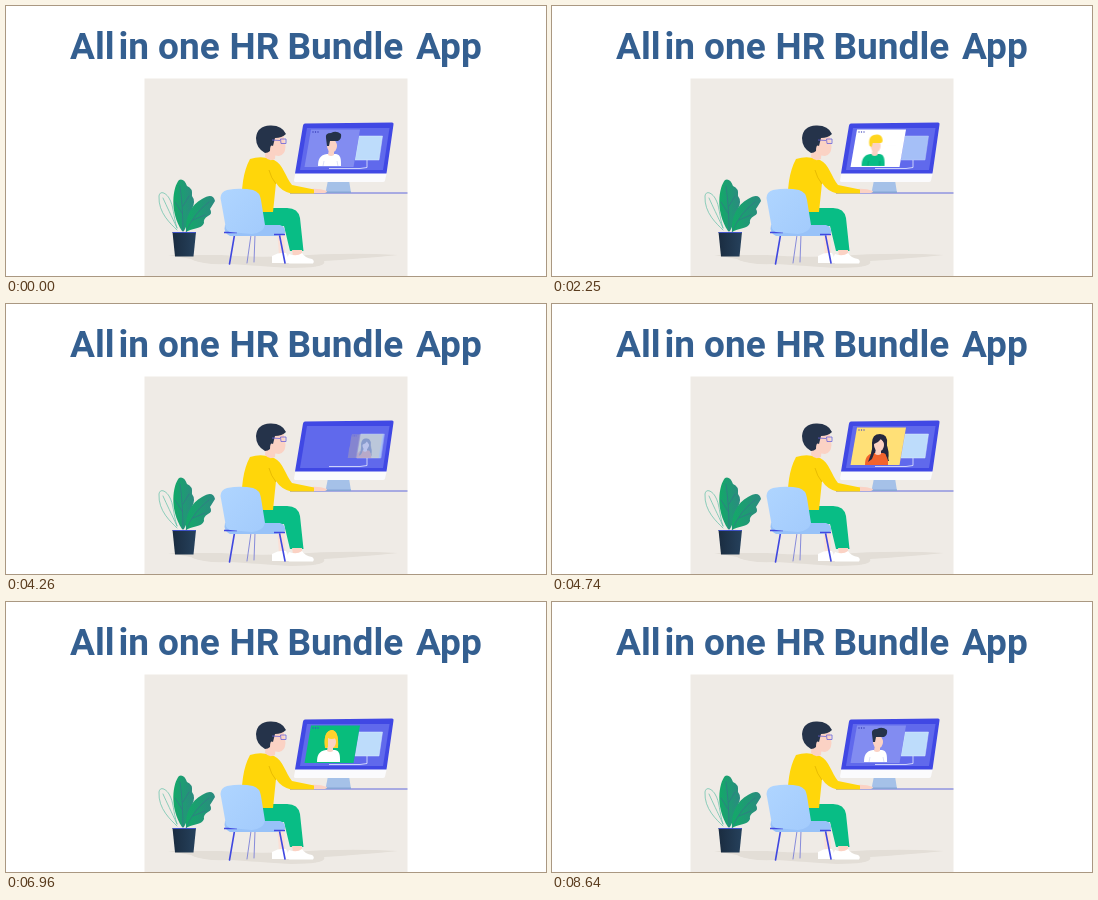
Animation, 540 px wide and 270 px high, one loop 9000 ms. Source, as an HTML page:

```html
<!DOCTYPE html>
<html lang="en">
<head>
<meta charset="utf-8">
<title>HR Bundle App</title>
<style>
html, body { margin: 0; width: 100%; height: 100%; overflow: hidden; background: #fff; }
svg { display: block; width: 540px; height: 270px; }
.title { font: 600 37px Roboto, Arial, sans-serif; fill: #345f90; }

/* A new card grows out of the side panel, then slides left into place. */
.card, .guest, .doc, .line, .panel { animation: 9s ease-out infinite both; }
.card { transform-origin: 326px 142px; }
.man { animation-name: man; }
.boy { animation-name: boy; }
.girl { animation-name: girl; }
.lady { animation-name: lady; }
.guest { animation-name: guest; }
.doc { animation-name: doc; }
.panel { animation-name: panel; }
.line { animation-name: line; transform-origin: 305px 0; }
.line.late { animation-name: late; }

@keyframes man {
  0%, 10.33% { opacity: 1; transform: none; }
  13%, 88.32% { opacity: 0; transform: none; }
  88.33% { opacity: 0; transform: translate(37px, 0) scale(.52); }
  90.8% { opacity: 1; transform: translate(20px, 0); }
  96%, 100% { opacity: 1; transform: none; }
}
@keyframes boy {
  0%, 10.33% { opacity: 0; transform: translate(37px, 0) scale(.52); }
  13.66% { opacity: 1; transform: translate(20px, 0); }
  20.33%, 43.5% { opacity: 1; transform: none; }
  47%, 100% { opacity: 0; transform: none; }
}
@keyframes girl {
  0%, 47% { opacity: 0; transform: translate(37px, 0) scale(.52); }
  49.3% { opacity: 1; transform: translate(20px, 0); }
  52.67%, 67.67% { opacity: 1; transform: none; }
  70.3%, 100% { opacity: 0; transform: none; }
}
@keyframes lady {
  0%, 67.67% { opacity: 0; transform: translate(37px, 0) scale(.52); }
  71% { opacity: 1; transform: translate(20px, 0); }
  77.33%, 88.33% { opacity: 1; transform: none; }
  90.8%, 100% { opacity: 0; transform: none; }
}
@keyframes guest {
  0%, 13.67% { transform: translate(324px, 142px); }
  20.33%, 25% { transform: translate(321.5px, 142px); }
  28.67%, 100% { transform: translate(340px, 134px) scale(.34); }
}
@keyframes doc {
  0%, 25% { opacity: 0; }
  28.67%, 100% { opacity: 1; }
}
@keyframes panel {
  0%, 10.33%, 52.67%, 67.67%, 77.33%, 88.33%, 96%, 100% { opacity: 1; transform: none; }
  13.66%, 49.3%, 71%, 90.8% { opacity: .8; transform: translate(7px, 0); }
  20.33%, 47% { opacity: .75; transform: none; }
}
@keyframes line {
  0%, 25% { transform: scaleX(0); }
  28.67%, 100% { transform: none; }
}
@keyframes late {
  0%, 37% { transform: scaleX(0); }
  43%, 100% { transform: none; }
}
</style>
</head>
<body>
<svg viewBox="0 0 540 270">
  <defs>
    <path id="win" d="M305 123.5H354L347.500 161H298.500Z"/>
    <path id="bust" d="M-12 18C-12 11 -10 7 -3 6H6C11 7 11 11 11 18Z"/>
    <g id="face" fill="#fbd2c4">
      <path d="M-1 1H4V7Q1 9 -2 7Z"/>
      <ellipse cx="2" cy="-2" rx="5" ry="6.500"/>
    </g>
    <g id="dots">
      <circle cx="307" cy="126" r=".7"/>
      <circle cx="309.500" cy="126" r=".7"/>
      <circle cx="312" cy="126" r=".7"/>
    </g>
    <clipPath id="screen"><path d="M298 120H386L379 164H291Z"/></clipPath>
    <linearGradient id="seat" x2="1" y2="1">
      <stop stop-color="#afd5ff"/><stop offset="1" stop-color="#a3cbfc"/>
    </linearGradient>
    <linearGradient id="pot" x2="1">
      <stop stop-color="#1a2c40"/><stop offset="1" stop-color="#26415c"/>
    </linearGradient>
    <linearGradient id="leaf" x2="1">
      <stop stop-color="#12aa68"/><stop offset="1" stop-color="#2b8a80"/>
    </linearGradient>
  </defs>

  <text class="title" y="53"><tspan x="64">All</tspan><tspan x="112.500">in</tspan><tspan x="152">one</tspan><tspan x="223.500">HR</tspan><tspan x="281.500">Bundle</tspan><tspan x="410">App</tspan></text>

  <path fill="#efebe6" d="M138.500 72.500H401.500V270H138.500Z"/>
  <path fill="#e3ded7" d="M162 249H215Q250 252 285 250Q340 246 392 249Q350 253 318 255Q322 262 285 262Q240 259 222 258Q195 259 185 253Z"/>

  <!-- plant -->
  <g stroke-linejoin="round" stroke-linecap="round">
    <path fill="none" stroke="#5fbfa6" stroke-width=".7" d="M171 224C165 218 152 207 153 190C154 184 160 187 163 192C168 200 167 210 171 222M171 222C165 209 161 201 157 192"/>
    <path fill="url(#leaf)" d="M176 225C163 205 167 181 173 174Q178 172 181 180Q187 182 186 190Q190 195 186 203C185 212 181 219 178 225Z"/>
    <path fill="url(#leaf)" d="M180 226C179 211 185 199 196 193Q207 186 209 195Q206 200 204 203Q207 208 202 210Q197 213 198 217C196 223 186 222 180 226Z"/>
    <path fill="none" stroke="#3a6f8c" stroke-width=".6" d="M177 226Q177 200 174 180M180 226Q188 207 203 196M177 200L183 190M176 207L169 196M187 214L199 209"/>
    <path fill="url(#pot)" d="M166.500 226H190L187.500 250.500H169Z"/>
    <path stroke="#3f52c8" d="M167 226.500H189.500"/>
  </g>

  <!-- desk and monitor -->
  <path stroke="#6168dd" d="M284 187H401.500"/>
  <path fill="#a5c1e8" d="M322 174H343L345 187H319.500Z"/>
  <path fill="#86a5d6" d="M319.500 185.500H345V187H319.500Z"/>
  <path fill="#fbfbfd" d="M289.500 166H381L379 174.500Q378.500 176 377 176H289.500Q288 176 288 174.500Z"/>
  <path fill="#4048e4" d="M299 117.500L386 116.500Q388 116.500 387.500 118.500L380.500 167.500H289L297 119.500Q297.500 117.500 299 117.500Z"/>
  <path fill="#6069ec" d="M301 122H383.500L377 164H294Z"/>
  <g clip-path="url(#screen)">
    <path fill="none" stroke="#e8ecff" stroke-width=".8" d="M323 162.500H354L361 161.500V154"/>
    <path class="panel" fill="#bddcfb" stroke="#d9eafd" stroke-width=".5" d="M353 130H376.500L373 154H349Z"/>

    <g class="card man">
      <use href="#win" fill="#828cf1"/>
      <use href="#dots" fill="#3238b4"/>
      <g transform="translate(324 142)">
        <use href="#bust" fill="#fff"/>
        <use href="#face"/>
        <path fill="#25334a" d="M-3 -2L-4 -10Q-5 -15 1 -15Q6 -18 11 -14Q12 -9 8 -7L0 -7L-1 -2Z"/>
        <path fill="none" stroke="#c5cdf1" stroke-width=".6" d="M-7 18L-6 13M7 13L8 18"/>
      </g>
    </g>

    <g class="card boy">
      <use href="#win" fill="#fff"/>
      <use href="#dots" fill="#4b50c0"/>
      <g class="doc">
        <path fill="#dbeaf7" d="M335.500 128H346L344.500 139.500H334.500Z"/>
        <g stroke-width="1.100">
          <path class="line" stroke="#4654dd" d="M307.500 131.500H331"/>
          <path class="line" stroke="#aab9ef" d="M307 134H327"/>
          <path class="line late" stroke="#d5dcf5" d="M305 140H331M304.500 143.500H326"/>
          <path class="line" stroke="#3d49d8" stroke-width="1.500" d="M303.500 148.500H309M311 148.500H316M318 148.500H323"/>
          <path class="line late" stroke="#c7d1f2" d="M302 153.500H341"/>
        </g>
      </g>
      <g class="guest">
        <use href="#bust" fill="#08bd85"/>
        <use href="#face"/>
        <path fill="#ffd51d" d="M-4 -2Q-6 -11 0 -13Q8 -15 9 -8Q9 -5 7 -5H-1L-2 -1Z"/>
        <path fill="none" stroke="#07966a" stroke-width=".6" d="M-6 18L-5 13M6 18V13"/>
      </g>
    </g>

    <g class="card girl">
      <use href="#win" fill="#ffe077"/>
      <use href="#dots" fill="#4b50c0"/>
      <g transform="translate(325 143)">
        <path fill="#25283f" d="M-9 15Q-4 5 -5 -4Q-5 -13 3 -13Q11 -13 10 -3Q9 6 12 14Z"/>
        <use href="#bust" fill="#f2632c"/>
        <use href="#face"/>
        <path fill="#25283f" d="M-3 -3Q-4 -12 3 -12Q10 -12 9 -4Q5 -6 4 -8Q2 -5 -3 -3ZM-4 -2Q-1 4 -5 12L-9 15Q-5 6 -4 -2ZM8 -2Q7 6 11 13Q13 5 9 -4Z"/>
      </g>
    </g>

    <g class="card lady">
      <use href="#win" fill="#08bd7c"/>
      <use href="#dots" fill="#3d43d5"/>
      <g transform="translate(323 142)">
        <path fill="#ffd22b" d="M-4 4Q-6 -13 3 -14Q10 -13 9 4Z"/>
        <use href="#bust" fill="#fff"/>
        <use href="#face"/>
        <path fill="#ffd22b" d="M-4 3Q-6 -13 3 -14Q10 -13 9 3L7 2V-6Q2 -4 -1 -6V3Z"/>
      </g>
    </g>
  </g>

  <!-- worker -->
  <path fill="#fbe0d6" d="M271 222H278L279 249H273Z"/>
  <path fill="#fff" d="M266 250Q273 246 280 247L285 257H266Z"/>
  <path fill="#08bd85" d="M250 202H279Q292 201 294 212L297.500 245H284L278 220L253 224Z"/>
  <path fill="#fbd2c4" d="M286 244H296V250H287Z"/>
  <path fill="#fff" d="M283 248Q291 251 296 247Q299 252 306 253Q309 255 307 257.500H283Q279 255 283 248Z"/>
  <path fill="#fbd2c4" d="M304 183Q313 182 321 185Q321 187 317 187H304Z"/>
  <path fill="#ffd60a" d="M244 153Q256 149 268 154C277 158 280 172 286 179L308 183.500V187.500H285Q275 185 270 177L267 206H236Q234 171 244 153Z"/>
  <path fill="none" stroke="#e2b500" stroke-width=".8" d="M270 178Q265 172 263 164"/>
  <path fill="#fbd2c4" d="M260 140H270L269 153Q263 156 259 151Z"/>
  <path fill="#fbd2c4" d="M264 128H277.500L279.500 141Q279 149 273 150Q265 150 263 141Z"/>
  <path fill="#25334a" d="M259 147Q250 142 250 132Q251 120 264 119.500Q276 119 280 128Q276 132 269 132L267 140Q264 138 264 145Q262 147 259 147Z"/>
  <path fill="none" stroke="#6a62d8" stroke-width=".8" d="M266 134L274 134.500M274.500 133H280V137.500H275Z"/>

  <!-- chair -->
  <g fill="none" stroke="#4048e0" stroke-width="1.600" stroke-linecap="round">
    <path stroke="#7b80d8" stroke-width=".9" d="M249 229L248 256M245 229L241 257"/>
    <path d="M228.500 229L223.500 258M273.500 229L279 257"/>
  </g>
  <path fill="#98c2f8" d="M219 219H274Q280 221 279 227Q276 230 267 230H224Q217 227 219 219Z"/>
  <path stroke="#4048e0" stroke-width="1.300" d="M218 226.500H231M268 228.500H279"/>
  <path fill="url(#seat)" d="M221 184Q235 181.500 247 184Q254 186 255 194L259 219Q257 227 246 228L224 226Q219 224 219 217L214.500 192Q214.500 186 221 184Z"/>
</svg>
</body>
</html>
```
